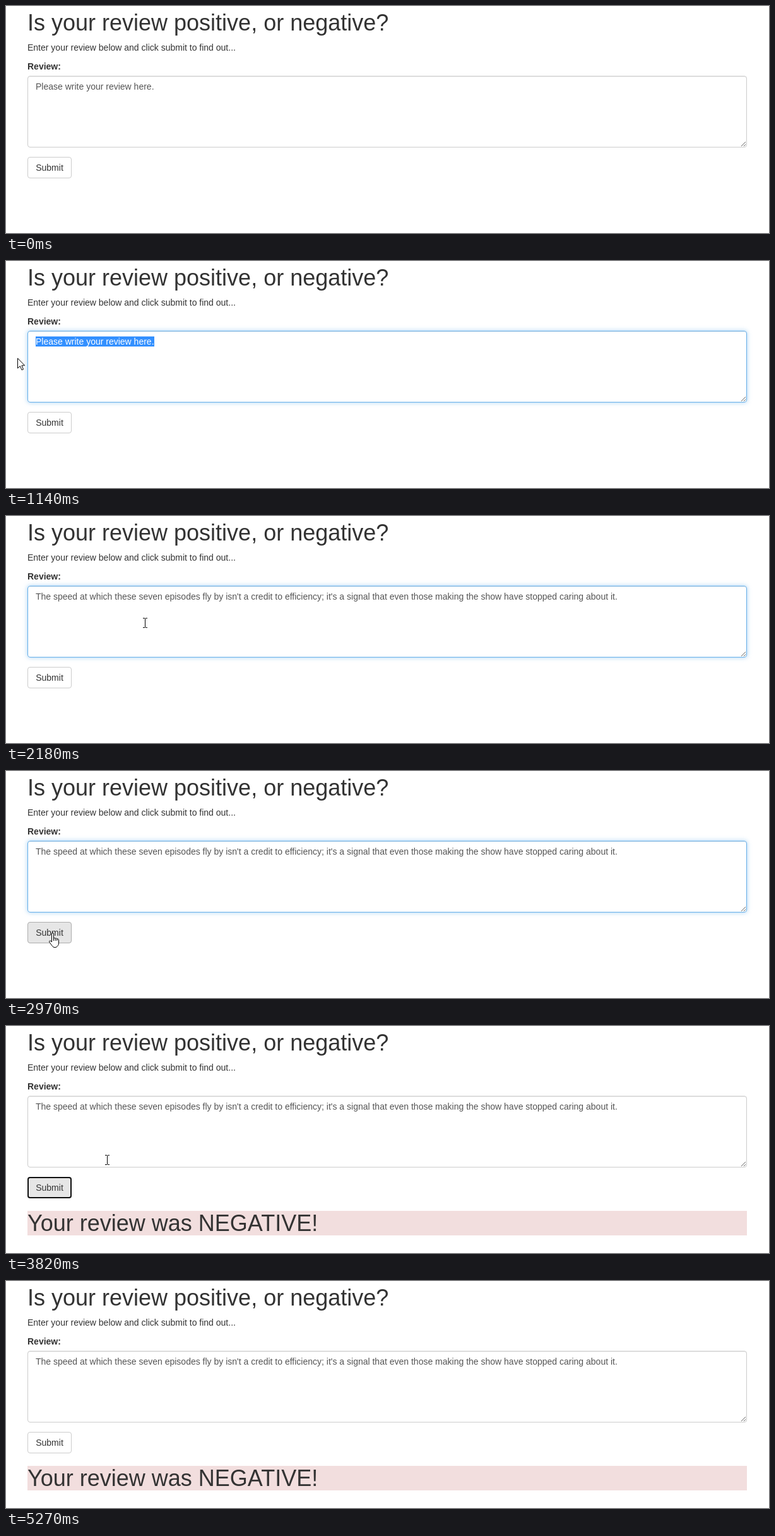
Write an HTML page that moves like this. It is 1209 by 361 pixels and loops after 5.34 s.

```html
<!DOCTYPE html>
<html lang="en">
<head>
<meta charset="utf-8">
<title>Review sentiment</title>
<style>
html, body { margin: 0; width: 100%; height: 100%; overflow: hidden; background: #fff; }
body { position: relative; font: 14px/20px "Liberation Sans", Arial, sans-serif; color: #333; }
body > * { position: absolute; left: 34px; margin: 0; box-sizing: border-box; white-space: pre; }
h1 { top: 7px; width: 1140px; height: 39px; font-size: 36px; font-weight: 500; line-height: 39px; }
p { top: 56px; }
b { top: 86px; }
#box { top: 111px; width: 1140px; height: 114px; padding: 6px 12px; border: 1px solid; border-radius: 4px; color: #555; resize: vertical; overflow: auto; }
#text { position: relative; }
#text.selected { background: #3390ff; color: #fff; }
#caret { position: absolute; left: 100%; top: 0; width: 1px; height: 16px; background: #000; }
#button { top: 240px; width: 70px; height: 34px; border: 1px solid #ccc; border-radius: 4px; background: #fff; line-height: 32px; text-align: center; }
#button.hover { background: #e6e6e6; border-color: #adadad; }
#button.focus { background: #e6e6e6; border: 2px solid #101010; line-height: 30px; }
#result { top: 294px; background: #f2dede; }
#pointer { left: 0; top: 0; overflow: visible; fill: #fff; stroke: #000; }
#beam { shape-rendering: crispEdges; }
</style>
</head>
<body>
<h1>Is your review positive, or negative?</h1>
<p>Enter your review below and click submit to find out...</p>
<b>Review:</b>
<div id="box"><span id="text"><span id="words"></span><i id="caret"></i></span></div>
<div id="button">Submit</div>
<h1 id="result">Your review was NEGATIVE!</h1>
<svg id="pointer" width="1" height="1">
  <path id="arrow" d="M.5 .7V16.6L4.3 13 7 19.3 9.5 18.2 6.9 12.1H11.6Z"/>
  <path id="beam" d="M-3 -7.5H0M1 -7.5H4M.5 -7V7M-3 7.5H0M1 7.5H4"/>
  <path id="hand" d="M-.5 15V2a1.5 1.5 0 0 1 3 0v7q1.4-1.2 2.7.3 1.6-1 2.6.6 2.7-.4 2.7 2V17q0 3-2 4.5-1 2-3.5 2H4Q1.5 23.5 .5 21.5L-4 15.5q-1-2 .6-2.6 1.2-.3 2.9 2.1zM2.5 9V13M5.2 9.5V13M7.8 10V13"/>
</svg>
<script>
const LOOP = 5340;
const STEP = 60; // the pointer moves in jumps of about this many ms
const PROMPT = "Please write your review here.";
const REVIEW = "The speed at which these seven episodes fly by isn't a credit to efficiency; it's a signal that even those making the show have stopped caring about it.";

const $ = id => document.getElementById(id);
const clamp = v => Math.max(0, Math.min(1, v));
const within = (v, a, b) => v >= a && v < b;
const spot = (x, y) => ({ x, y });

const middle = spot(157, 182);
const submit = spot(73, 257);
const rest = spot(160, 213);

// each visit: when the pointer leaves, and the spots it passes by time
const visits = [
  { gone: 860, path: { 220: spot(961, 306), 690: spot(239, 125) } },
  { gone: 1600, path: { 1140: spot(18, 154), 1370: middle } },
  { gone: 4860, path: {
    2060: middle, 2180: spot(220, 170), 2580: spot(130, 254), 2690: submit,
    3310: submit, 3490: rest, 4170: rest, 4740: spot(1028, 315)
  } }
];

function pointerAt(t) {
  const visit = visits.find(v => t < v.gone);
  if (!visit) return null;
  const times = Object.keys(visit.path).map(Number);
  if (t < times[0]) return null;
  const start = times.findLast(time => time <= t);
  const end = times.find(time => time > t);
  const from = visit.path[start];
  if (!end) return from;
  const to = visit.path[end];
  const steps = Math.round((end - start) / STEP);
  const part = Math.floor((t - start) / (end - start) * steps + 1e-6) / steps;
  const mix = (a, b) => Math.round(a + (b - a) * part);
  return spot(mix(from.x, to.x), mix(from.y, to.y));
}

function shapeAt({ x, y }) {
  if (within(x, 34, 1174) && within(y, 111, 225)) return "beam";
  if (within(x, 34, 104) && within(y, 240, 274)) return "hand";
  return "arrow";
}

function show(id, on) {
  $(id).style.display = on ? "" : "none";
}

function drawBox(t) {
  const glow = clamp(Math.min(t - 770, 3090 - t) / 90);
  const mix = to => 204 + (to - 204) * glow;
  $("box").style.borderColor = `rgb(${mix(102)},${mix(175)},${mix(233)})`;
  $("box").style.boxShadow =
    `inset 0 1px 1px rgba(0,0,0,.075), 0 0 ${7 * glow}px rgba(102,175,233,${0.6 * glow})`;

  $("words").textContent = t < 1600 ? PROMPT : REVIEW;
  $("text").className = within(t, 815, 1600) ? "selected" : "";
  show("caret", within(t, 1600, 2120));
}

function draw(t) {
  drawBox(t);
  show("result", t >= 3820);

  const pos = pointerAt(t);
  const shape = pos && shapeAt(pos);
  for (const id of ["arrow", "beam", "hand"]) show(id, id === shape);
  if (pos) $("pointer").style.transform = `translate(${pos.x}px,${pos.y}px)`;
  $("button").className = within(t, 3030, 5270) ? "focus" : shape === "hand" ? "hover" : "";
}

function tick() {
  draw(performance.now() % LOOP);
  requestAnimationFrame(tick);
}
tick();
</script>
</body>
</html>
```
